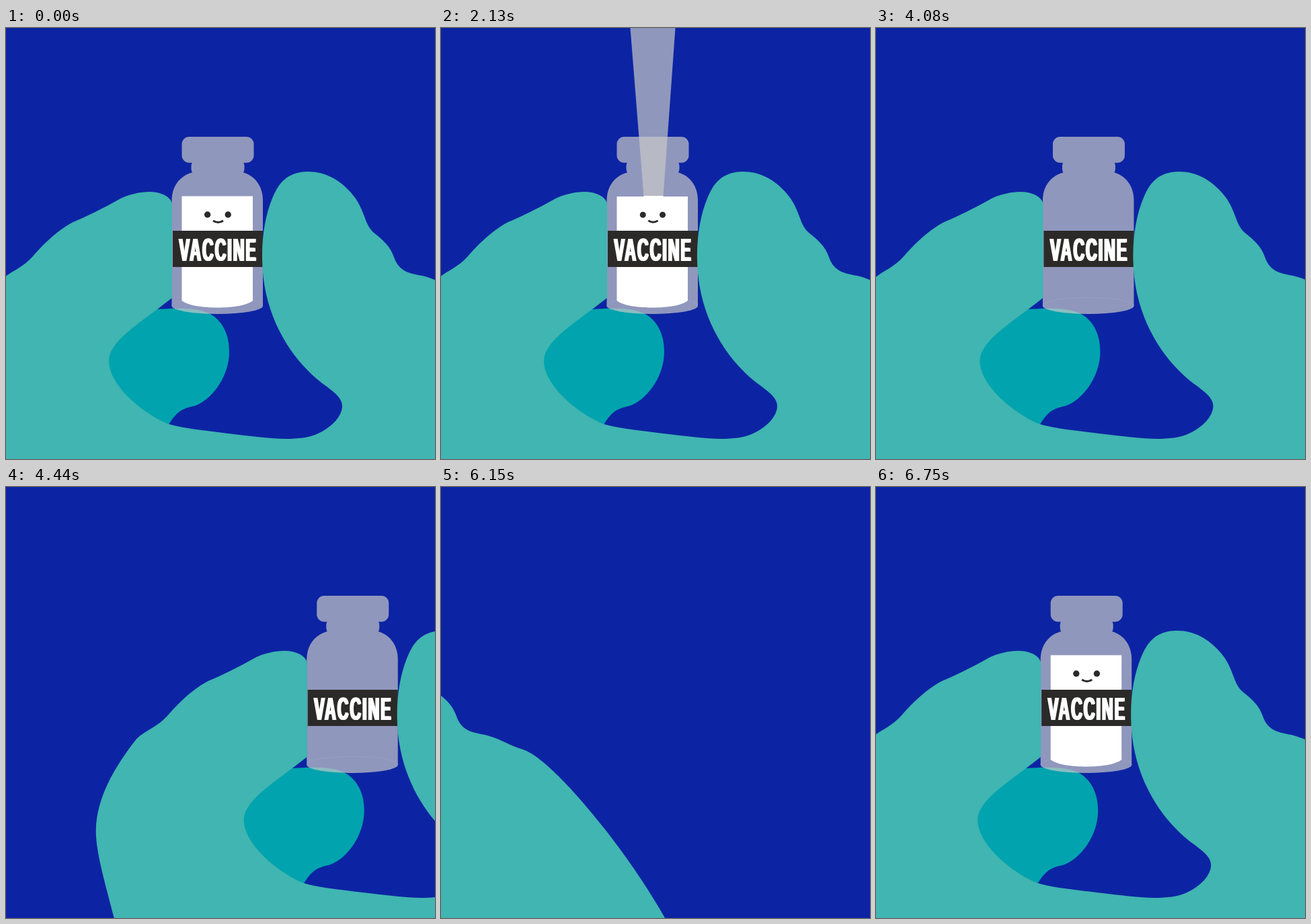
Recreate the animation shown at these times as an HTML page. Size 638x642 px, loop 6.78 s.

```html
<!DOCTYPE html>
<html lang="en">
<head>
<meta charset="utf-8">
<title>Vaccine vial</title>
<style>
  html, body { margin: 0; width: 100%; height: 100%; overflow: hidden; background: #0c24a3; }
  svg { display: block; width: 100vw; height: 100vh; }
  .word { font: bold 48.8px "Liberation Sans", Arial, sans-serif; letter-spacing: 4.5px; fill: #fff; text-anchor: middle; }
</style>
</head>
<body>
<svg viewBox="0 0 638 642">
  <rect width="638" height="642" fill="#0c24a3"/>
  <g id="scene">
    <path fill="#00a3ae" d="M225 419C250 417 283 416 302 425C323 436 332 458 332 482C332 520 305 555 280 563C262 567 254 571 242 591L140 560V440Z"/>

    <g fill="#c8c8c8" opacity=".7">
      <rect x="261.5" y="162" width="107" height="38.8" rx="11"/>
      <rect x="275.5" y="195" width="79" height="25" rx="10"/>
      <path d="M246.5 414V257C246.5 232 263 216 284 214H346C366 216 382 232 382 257V414Z"/>
      <ellipse cx="314.3" cy="413.7" rx="67.8" ry="12.3"/>
    </g>
    <path d="M246.5 413A67.8 12 0 0 1 382 413" fill="none" stroke="#a9abc2" stroke-width=".8" opacity=".5"/>

    <path id="liquid" fill="#fff"/>
    <g id="needle">
      <path id="barrel" fill="#c8c8c8" opacity=".7"/>
      <path id="fill" fill="#fff"/>
    </g>

    <g id="face" fill="#2b2a29">
      <circle cx="299.6" cy="278" r="4.7"/>
      <circle cx="330.2" cy="278" r="4.7"/>
      <path d="M308 287Q315.5 292 323 287" fill="none" stroke="#2b2a29" stroke-width="3"/>
    </g>

    <rect x="248" y="302" width="134" height="54" fill="#2b2a29"/>
    <text id="word" class="word" transform="translate(315.8 346.6) scale(.47 1)">VACCINE</text>
    <use href="#word" x="-1.3"/>
    <use href="#word" x="1.3"/>

    <path fill="#40b5b1" d="M-40 642C-52 595 -67 545 -67 513C-67 465 -40 418 -8 377C4 363 22 360 40 340
      C57 320 80 299 100 289C122 280 145 268 165 257C180 248 200 244 213 244C235 244 246 254 247 262V402
      L225 419C190 445 153 470 153 496C153 535 210 578 242 590C265 597 300 600 330 604C365 608 395 612 416 612
      C435 612 450 610 462 605C485 595 500 578 500 563C500 550 485 540 470 529C425 494 382 430 381 345
      C380 300 390 260 405 236C417 219 432 214 450 214C480 214 504 232 520 254C534 275 534 293 546 304
      C560 316 571 323 578 344C585 362 600 366 619 369C640 374 658 386 676 391C720 405 830 540 887 642Z"/>
  </g>
</svg>
<script>
const STEP = 30, LOOP = 6780;
const TIP = 251, TRAVEL = 267, RISE = 289;
const $ = id => document.getElementById(id);
const [scene, liquid, needle, barrel, fill, face] =
  ['scene', 'liquid', 'needle', 'barrel', 'fill', 'face'].map($);

// smooth progress from 0 to 1 between two ticks
function ease(tick, from, to) {
  const p = Math.min(1, Math.max(0, (tick - from) / (to - from)));
  return p * p * (3 - 2 * p);
}

// slice of the tapered needle from height y down to its tip
function cone(y) {
  const k = y / TIP;
  return `M${281.5 + 20 * k} ${y}H${348.5 - 18 * k}L330.5 ${TIP}H301.5Z`;
}

function liquidPath(s) {
  const y = 250.5 + 155.5 * s, sag = y + 14 * s;
  return `M261.5 ${y}C277 ${sag} 352 ${sag} 367 ${y}V406C352 420 277 420 261.5 406Z`;
}

const show = (el, on) => el.setAttribute('visibility', on ? 'visible' : 'hidden');

function draw(ms) {
  const tick = Math.floor((ms % LOOP) / STEP);
  const entering = tick >= 180;

  const x = entering ? -1231 * (1 - ease(tick, 181, 226)) : 993 * ease(tick, 135, 180);
  scene.setAttribute('transform', `translate(${x} 0)`);

  const down = ease(tick, 30, 60) - ease(tick, 110, 140);
  needle.setAttribute('transform', `translate(0 ${-TRAVEL * (1 - down)})`);
  show(needle, tick > 30 && tick < 136);

  const drain = entering ? 0 : ease(tick, 70, 100);
  liquid.setAttribute('d', liquidPath(drain));
  show(liquid, drain < 1);
  fill.setAttribute('d', cone(TIP - RISE * drain));
  show(fill, drain > 0 && tick < 136);

  const size = entering ? 1 : 1 - ease(tick, 70, 78);
  face.setAttribute('transform', `translate(315 283) scale(${size}) translate(-315 -283)`);
  show(face, size > 0);
}

function loop() {
  draw(performance.now());
  requestAnimationFrame(loop);
}

barrel.setAttribute('d', cone(-300));
loop();
</script>
</body>
</html>
```
